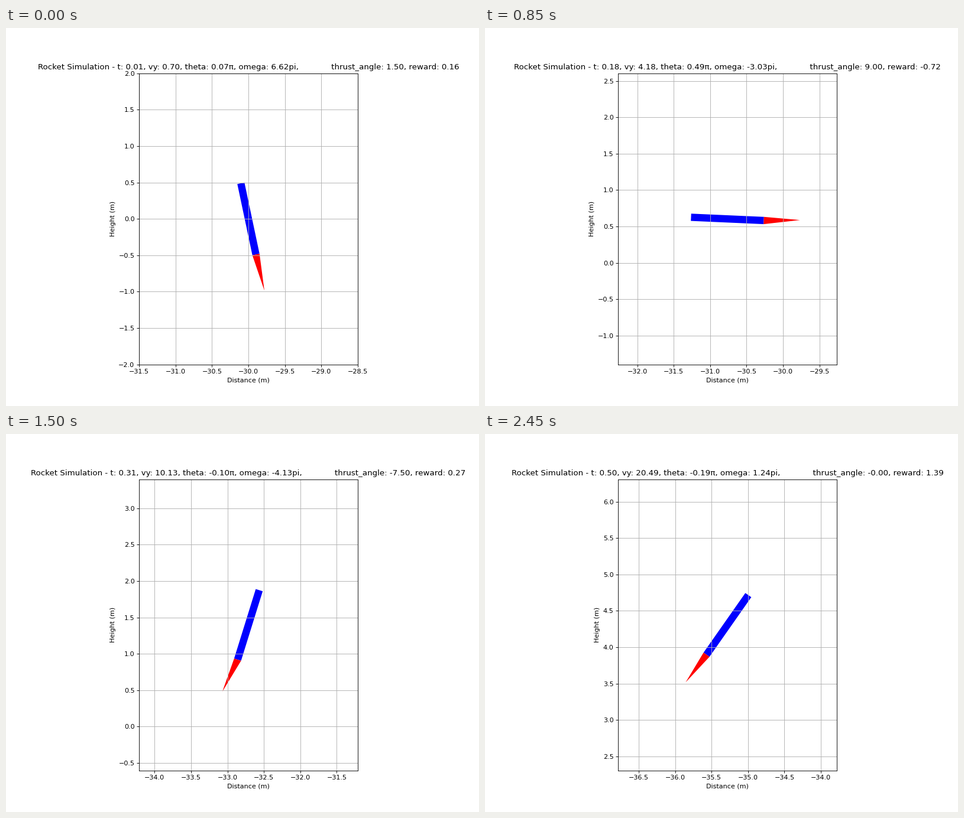
Animation of 800 by 640 pixels, one loop 2500 ms. Source, as a matplotlib script:

```python
import numpy as np
import matplotlib.pyplot as plt
from matplotlib.animation import FuncAnimation

FRAMES, INTERVAL = 50, 50
DT, GRAVITY, THRUST = 0.01, 9.8, 80.0
LENGTH, WIDTH, FLAME = 1.0, 0.1, 0.5
INERTIA = (LENGTH**2 + WIDTH**2) / 12
NOZZLE_STEP = 1.5  # degrees per control action
ACTIONS = ("+" * 12 + "-" * 11 + "+" + "-" * 9 + "+++" + "--"
           + "++++-+++--++")
REWARD_STEPS = [0, 9, 17, 25, 30, 37, 49]
REWARDS = [0.16, 0.10, -0.72, -0.55, 0.27, 0.78, 1.39]


def simulate():
    """Return (x, y, vy, theta, omega, nozzle) after every action."""
    x, y, vx, vy = -30.0, 0.0, 0.0, 0.0
    theta, omega, nozzle = 0.0, 6.6238 * np.pi, 0.0
    states = []
    for action in ACTIONS:
        gimbal = np.radians(nozzle)
        x += vx * DT
        y += vy * DT
        vx -= THRUST * np.sin(theta - gimbal) * DT
        vy += (THRUST * np.cos(theta - gimbal) - GRAVITY) * DT
        omega -= THRUST * np.sin(gimbal) * LENGTH / INERTIA * DT
        theta += omega * DT
        nozzle += NOZZLE_STEP if action == "+" else -NOZZLE_STEP
        states.append((x, y, vy, theta, omega, nozzle or -0.0))
    return states


def rocket_shapes(x, y, theta, nozzle):
    """Corner points of the body and of the flame."""
    w, h = WIDTH / 2, LENGTH / 2
    c, s = np.cos(theta), np.sin(theta)
    local = np.array([(-w, -h), (w, -h), (w, h), (-w, h)])
    body = local @ np.array([(c, s), (-s, c)]) + (x, y)
    left, right = body[:2]
    aim = theta + np.radians(nozzle)
    tip = ((left[0] + right[0]) / 2 + FLAME * np.sin(aim),
           left[1] - FLAME * np.cos(aim))
    return body, np.array([left, right, tip])


STATES = simulate()

fig, ax = plt.subplots(figsize=(10, 8), dpi=80)
ax.set_aspect("equal")
ax.set_xlabel("Distance (m)")
ax.set_ylabel("Height (m)")
ax.grid(True)
body_patch, = ax.fill([0, 1, 1, 0], [0, 0, 1, 1], "b")
flame_patch, = ax.fill([0, 1, 0], [0, 0, 1], "r")


def draw(i):
    x, y, vy, theta, omega, nozzle = STATES[i]
    body, flame = rocket_shapes(x, y, theta, nozzle)
    body_patch.set_xy(body)
    flame_patch.set_xy(flame)
    ax.set_xlim(x - 1.5, x + 1.5)
    ax.set_ylim(y - 2, y + 2)
    reward = np.interp(i, REWARD_STEPS, REWARDS)
    ax.set_title(
        f"Rocket Simulation - t: {(i + 1) * DT:.2f}, vy: {vy:.2f}, "
        f"theta: {theta / np.pi:.2f}π, omega: {omega / np.pi:.2f}pi,"
        + " " * 13
        + f"thrust_angle: {nozzle:.2f}, reward: {reward:.2f}")
    return body_patch, flame_patch


def reset():
    return draw(0)


anim = FuncAnimation(fig, draw, frames=FRAMES, init_func=reset,
                     interval=INTERVAL, repeat=True, repeat_delay=0)
plt.show()
```
